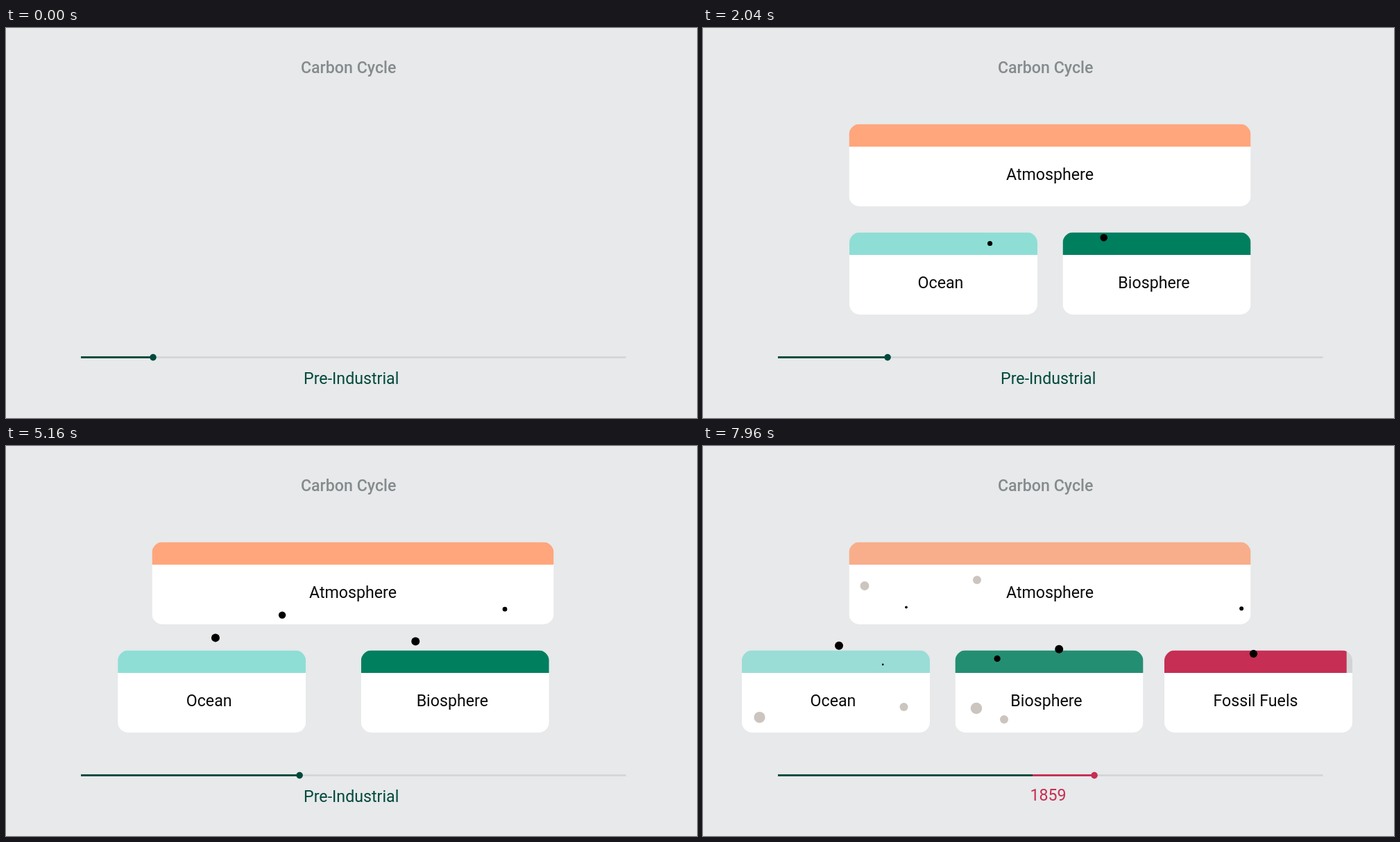
Animation of 996 by 562 pixels, one loop 8 s. Source, as an HTML page with a canvas:

```html
<!DOCTYPE html>
<html lang="en">
<head>
<meta charset="utf-8">
<title>Carbon Cycle</title>
<style>
  html, body { margin: 0; width: 100%; height: 100%; overflow: hidden; background: #e7e9ea; }
  canvas { display: block; width: 996px; height: 562px; }
</style>
</head>
<body>
<canvas id="stage"></canvas>
<script>
const W = 996, H = 562, LOOP = 8000;
const canvas = document.getElementById('stage');
const ctx = canvas.getContext('2d');
const ratio = window.devicePixelRatio || 1;
canvas.width = W * ratio;
canvas.height = H * ratio;

const BG = '#e7e9ea', TRACK = '#d2d5d6', GREEN = [0, 73, 60], RED = [198, 46, 83];
const RED_START = 6190, BAR_FADE = 7700;
const CARD_H = 118.5, BAR_H = 32.5, ENTER = 750;
const TRAVEL = 1000, GAP = 978, TOP = 231, BOTTOM = 315.5;

const clamp = v => Math.max(0, Math.min(1, v));
const span = (t, start, length) => clamp((t - start) / length);
const easeOut = u => 1 - (1 - u) ** 3;
const easeInOut = u => u < 0.5 ? 4 * u ** 3 : 1 - (2 - 2 * u) ** 3 / 2;
const mix = (a, b, u) => a + (b - a) * u;
const rgb = c => `rgb(${c.map(Math.round).join(',')})`;

// Lane of the n-th dot in a stream: a sine sampled at whole steps
const lane = (mid, swing, step, phase) => n => mid + swing * Math.sin(step * n + phase);

// Streams send one dot per gap; spots are where carbon settles inside a card
const cards = [
  {
    label: 'Atmosphere', x: 210.5, y: 138.5, w: 579, color: '#ffa67c', enter: 120,
    spots: [[184.5, 54.5], [22.5, 63]], streams: []
  },
  {
    label: 'Ocean', x: 211, y: 294.5, w: 271, color: '#8eded6', enter: 225, move: 5070,
    spots: [[233.5, 81.5], [25.5, 96.5]],
    streams: [
      { up: false, first: 1100, gap: GAP, x: lane(215, 22, 2.1, -0.6) },
      { up: true, first: 2742, gap: GAP, x: lane(155, 95, 1.15, -2.45) }
    ]
  },
  {
    label: 'Biosphere', x: 518.5, y: 294.5, w: 271, color: '#007f5f', enter: 325, move: 5150,
    spots: [[70.5, 99.5], [30.5, 83.5]],
    streams: [
      { up: false, first: 1200, gap: GAP, x: lane(135, 85, 2.1, -1.1) },
      { up: true, first: 2802, gap: GAP, x: lane(140, 78, 1.75, 0.55) }
    ]
  },
  {
    label: 'Fossil Fuels', x: 665, y: 294.5, w: 271, color: rgb(RED), enter: 5162, burns: true,
    spots: [],
    streams: [{ up: true, first: 6230, gap: 770, x: lane(120, 10, 2.1, 3.1) }]
  }
];

function text(str, x, y, color, weight = 400) {
  ctx.font = `${weight} 23.2px Roboto, sans-serif`;
  ctx.textAlign = 'center';
  ctx.fillStyle = color;
  ctx.fillText(str, x, y);
}

function dot(x, y, r, color) {
  ctx.fillStyle = color;
  ctx.beginPath();
  ctx.arc(x, y, r, 0, Math.PI * 2);
  ctx.fill();
}

function rect(x, y, w, h, color) {
  ctx.fillStyle = color;
  ctx.fillRect(x, y, w, h);
}

const cardX = (card, t) => card.x - (card.move ? 155 * easeOut(span(t, card.move, ENTER)) : 0);

// Growth since the industrial start, shared by the year and the fuel bar
const growth = t => Math.max(0, t - RED_START) ** 2 / 1e6;

function drawCard(card, t) {
  const u = span(t, card.enter, ENTER);
  if (!u) return;
  const shown = easeOut(u);
  const x = cardX(card, t), y = card.y + 28 * (1 - shown);
  ctx.save();
  ctx.beginPath();
  ctx.roundRect(x, y, card.w, CARD_H, 15);
  ctx.clip();

  ctx.globalAlpha = shown;
  const used = card.burns ? growth(t) * 2.6 : 0;
  rect(x, y, card.w - used, BAR_H, card.color);
  if (used) rect(x + card.w - used, y, used, BAR_H, TRACK);
  if (!card.burns && t > BAR_FADE) {
    ctx.globalAlpha = 0.17 * span(t, BAR_FADE, 260);
    rect(x, y, card.w, BAR_H, TRACK);
  }

  ctx.globalAlpha = clamp(u * 2.15);
  rect(x, y + BAR_H, card.w, CARD_H - BAR_H, '#fff');
  text(card.label, x + card.w / 2 - (card.w < 300 ? 4 : 0), y + 80.5, '#0b0b0b');
  ctx.restore();
}

// Settled carbon pops in, overshoots, then rests
function drawSpots(card, i, t) {
  card.spots.forEach(([dx, dy], wave) => {
    const start = 6460 + 100 * i + 1050 * wave;
    if (t <= start) return;
    const grow = Math.sin(span(t, start, 260) * Math.PI / 2);
    const settle = easeInOut(span(t, start + 260, 300));
    dot(cardX(card, t) + dx, card.y + dy, 8.3 * grow - 2.3 * settle, '#ccc5bf');
  });
}

function drawStream(card, { up, first, gap, x }, t) {
  for (let n = 0; first + n * gap < t; n++) {
    const p = (t - first - n * gap) / TRAVEL;
    if (p >= 1) continue;
    const y = mix(TOP, BOTTOM, up ? 1 - p : p);
    const edge = clamp(Math.min(y - TOP, BOTTOM - y) / 25);
    dot(cardX(card, t) + x(n), y, 6 * Math.sqrt(1 - (1 - edge) ** 2), '#000');
  }
}

function drawTimeline(t) {
  const x = 212 + Math.max(0, t - 967) * 0.05034;
  const turn = span(t, RED_START - 60, 120);
  const color = rgb(GREEN.map((c, i) => mix(c, RED[i], turn)));
  rect(108, 473.3, 785.5, 2.6, TRACK);
  rect(108, 473.1, Math.min(x, 475) - 108, 2.9, rgb(GREEN));
  if (x > 475) rect(475, 473.1, x - 475, 2.9, rgb(RED));
  dot(x, 474.6, 4.8, color);

  const p = easeInOut(span(t, 5250, 550));
  ctx.save();
  if (p > 0 && p < 1) {
    ctx.beginPath();
    ctx.rect(400, 493, 200, 19.5);
    ctx.clip();
  }
  if (p < 1) text('Pre-Industrial', 497.7, 512.7 - 20 * p, rgb(GREEN));
  if (p > 0) text(String(1850 + Math.floor(growth(t) * 3.03)), 497.5, 511 + 20 * (1 - p), color);
  ctx.restore();
}

function draw(t) {
  ctx.setTransform(ratio, 0, 0, ratio, 0, 0);
  rect(0, 0, W, H, BG);
  text('Carbon Cycle', 493.7, 64.7, '#858b8d', 500);
  cards.forEach(card => drawCard(card, t));
  cards.forEach((card, i) => {
    drawSpots(card, i, t);
    card.streams.forEach(stream => drawStream(card, stream, t));
  });
  drawTimeline(t);
}

function tick() {
  draw(performance.now() % LOOP);
  requestAnimationFrame(tick);
}
tick();
</script>
</body>
</html>
```
